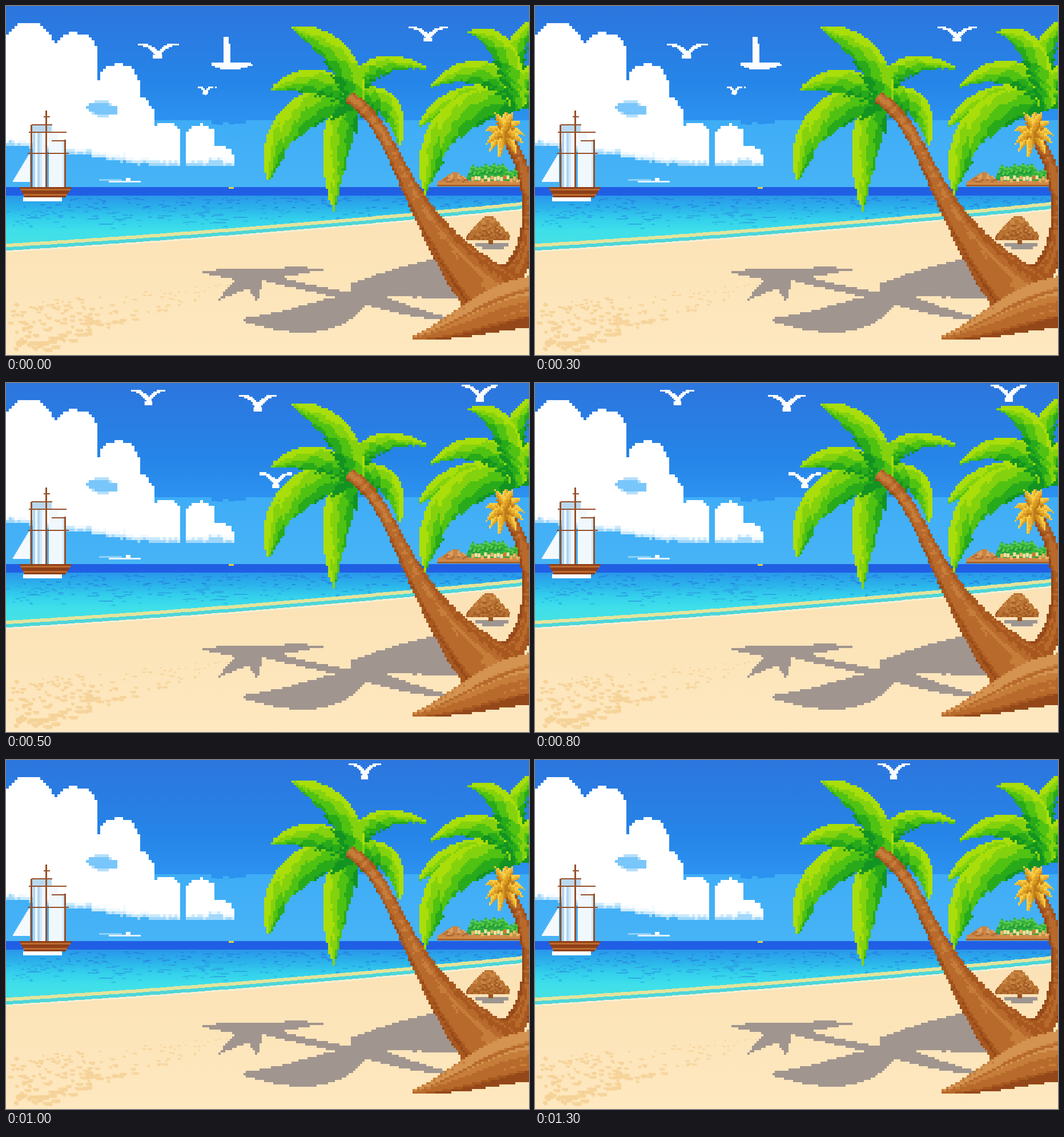
Write an HTML page with a canvas that moves like this. It is 916x611 px and loops after 1.5 s.

```html
<!DOCTYPE html>
<html lang="en">
<head>
<meta charset="utf-8">
<title>Pixel beach</title>
<style>
html, body { margin: 0; width: 100%; height: 100%; overflow: hidden; background: #fde5ba; }
canvas { position: absolute; left: 0; top: 0; }
.flock { visibility: hidden; animation: show 1500ms step-end infinite; }
.flock:nth-of-type(3) { animation-delay: -1000ms; }
.flock:nth-of-type(4) { animation-delay: -500ms; }
@keyframes show {
  0% { visibility: visible; }
  33.3333% { visibility: hidden; }
  100% { visibility: hidden; }
}
</style>
</head>
<body>
<canvas width="916" height="611"></canvas>
<canvas class="flock" width="916" height="611"></canvas>
<canvas class="flock" width="916" height="611"></canvas>
<canvas class="flock" width="916" height="611"></canvas>
<script>
const W = 916, H = 611;
const [scene, ...flocks] = [...document.querySelectorAll('canvas')].map(c => c.getContext('2d'));
let g = scene;

const hash = n => { const s = Math.sin(n * 127.1 + 11.7) * 43758.5453; return s - Math.floor(s); };
let seed = 7;
const rnd = () => hash(seed++);
const clamp = (v, lo, hi) => Math.max(lo, Math.min(hi, v));
const pick = (tones, v) => tones[clamp(Math.floor(v * tones.length), 0, tones.length - 1)];
const box = (color, x, y, w, h) => { g.fillStyle = color; g.fillRect(x, y, w, h); };
const times = (n, draw) => { for (let i = 0; i < n; i++) draw(i); };

function gradient(y0, y1, ...stops) {
  const gr = g.createLinearGradient(0, y0, 0, y1);
  stops.forEach((c, i) => gr.addColorStop(i / (stops.length - 1), c));
  return gr;
}

// Point on a Bezier curve of any order.
function at(pts, t) {
  while (pts.length > 1)
    pts = pts.slice(1).map(([x, y], i) => [pts[i][0] + (x - pts[i][0]) * t, pts[i][1] + (y - pts[i][1]) * t]);
  return pts[0];
}

// Thick pixel stroke: half(t) is the half width, paint(t, u) the colour at
// position t along the curve and u = -1..1 across it.
function limb(pts, half, paint, cell = 4) {
  const spine = [];
  times(61, i => {
    const t = i / 60, [x, y] = at(pts, t), [x0, y0] = at(pts, t - .01), [x1, y1] = at(pts, t + .01);
    const len = Math.hypot(x1 - x0, y1 - y0);
    spine.push({ t, x, y, w: half(t), dx: (x1 - x0) / len, dy: (y1 - y0) / len });
  });
  const pad = Math.max(...spine.map(p => p.w)) + 4;
  const lo = k => Math.floor((Math.min(...spine.map(p => p[k])) - pad) / cell) * cell;
  const hi = k => Math.max(...spine.map(p => p[k])) + pad;
  for (let y = lo('y'); y < hi('y'); y += cell)
    for (let x = lo('x'); x < hi('x'); x += cell) {
      let best = Infinity, p;
      for (const s of spine) {
        const d = Math.hypot(x + cell / 2 - s.x, y + cell / 2 - s.y);
        if (d < best) { best = d; p = s; }
      }
      const u = (p.dx * (y + cell / 2 - p.y) - p.dy * (x + cell / 2 - p.x)) / p.w;
      if (Math.abs(u) > 1 || best > p.w + 2) continue;
      const color = paint(p.t, u);
      if (color) box(color, x, y, cell, cell);
    }
}

const flat = color => () => color;

// Heap with a pointed top, wider towards its foot.
function mound(cx, top, w, h, tones) {
  for (let y = 0; y < h; y += 3) {
    const half = w / 2 * Math.min(1, .16 + (y / h) ** .85);
    for (let x = -half; x < half; x += 4)
      box(pick(tones, hash(Math.round(x / 4) + y * 7) * .6 + y / h * .4), Math.round(cx + x), top + y, 4, 3);
  }
}

function sky() {
  box(gradient(0, 200, '#2c76de', '#297de3', '#2685e8', '#2c92f0'), 0, 0, W, 200);
  box(gradient(200, 317, '#3fadf6', '#43b0f7', '#47b4f7'), 0, 200, W, 117);
  times(6, i => box('#2c92f0', 360 + i * 10, 199, 10, 2 + rnd() * 7));
}

function clouds() {
  const puffs = [[38, 72, 44], [118, 88, 42], [195, 136, 36], [222, 192, 35],
    [278, 230, 27], [338, 233, 27], [371, 270, 26]];
  const cell = 5;
  for (let x = 0; x < 398; x += cell) {
    const base = Math.min(275, 239 + x * .14) + 4 * hash(x);
    for (let y = 25; y < base; y += cell) {
      const under = puffs.filter(([cx, cy, r]) =>
        Math.abs(x - cx) < r && y > cy - Math.sqrt(r * r - (x - cx) ** 2) - 3 * hash(x + y));
      if (!under.length) continue;
      const core = under.some(([cx, cy, r]) => Math.hypot(x - cx + r * .25, (y - cy) * 1.2) < r * .48);
      const wisp = Math.sin(x * .13 + 2.2 * Math.sin(y * .028 + x * .01)) + .3 * Math.sin(y * .11);
      const depth = (base - y) / 12 - (core ? .5 : 0) - (wisp > .9 ? .35 : 0);
      box(pick(['#9fd8fb', '#cbe9fd', '#f0f9fe', '#ffffff'], depth), x, y, cell, cell);
    }
  }
  limb([[152, 178], [186, 182]], t => 15 * Math.sin(.6 + t * 2), (t, u) => Math.abs(u) > .75 ? '#b5dffb' : '#79c6fa', 5);
}

function sea() {
  box(gradient(332, 415, '#2a96ea', '#2bb2eb', '#34d0ec', '#3fe0ea', '#45e0e4'), 0, 332, W, 95);
  box('#205fe4', 0, 317, W, 15);
  times(330, () => {
    const x = rnd() * W, d = rnd() ** 1.5;
    box(pick(['#2589e2', '#2aa5e8', '#2bb9e6'], d), x, 335 + d * 55, 3 + rnd() * 7, 2);
  });
  times(22, () => box('#2ba8e2', rnd() * 400, 350 + rnd() * 32, 12 + rnd() * 14, 2));

  // distant boat and buoy
  box('#8dd0f8', 163, 303, 40, 3);
  box('#dff1fc', 180, 306, 56, 3);
  box('#ffffff', 210, 301, 8, 5);
  box('#e8d33c', 390, 317, 9, 3);
}

function beach() {
  const sand = gradient(360, 611, '#fbe2b6', '#fde5ba', '#fee8c0');
  for (let x = 0; x < W; x += 6) {
    const y = Math.round(430 - .06 * x - .000023 * x * x);
    box('#e2e49c', x, y - 14, 6, 6);
    box('#4ed6da', x, y - 8, 6, 6);
    box('#f8efd2', x, y - 2, 6, 3);
    box(sand, x, y + 1, 6, H - y);
  }
  times(330, () => {
    const x = rnd() * 390, d = rnd(), y = 520 - x * .09 + d * 95;
    if (d > 1.05 - x / 410) return;
    const s = .5 + (y - 485) / 100, w = (4 + rnd() * 8) * s;
    g.globalAlpha = .55 + .4 * (1 - x / 390);
    box('#f6d398', x, y, w, 3 * s);
    box('#f6d398', x + w * .25, y + 2 * s, w * .7, 2.4 * s);
  });
  g.globalAlpha = 1;
}

function ship() {
  const wood = '#96502a';
  times(16, i => box('#f4f9fd', 39 - i * 1.8, 260 + i * 3, 3 + i * 1.8, 3));
  box('#b9d9f0', 46, 208, 34, 13);
  times(14, i => {
    const gap = i === 6;
    if (!gap) box(pick(['#aed4f0', '#d3e8f7', '#f1f8fd'], hash(i + 3)), 47 + i * 4, 222 + (i > 10 ? 14 : 0), 4, i > 10 ? 82 : 96);
  });
  [[43, 208], [69, 183], [102, 234]].forEach(([x, top]) => box(wood, x, top, 3, 320 - top));
  [[45, 207, 36], [40, 220, 66], [38, 257, 72], [80, 235, 25], [66, 193, 11]]
    .forEach(([x, y, w]) => box(wood, x, y, w, 2));
  times(6, i => box(i % 3 === 1 ? '#bd6a30' : '#8f3f18', 24 + i * 1.6, 317 + i * 3, 91 - i * 3.6, 3));
  box('#ffffff', 30, 335, 68, 7);
}

function island() {
  times(12, i => mound(818 + i * 7.4, 274 + hash(i + 40) * 14, 22, 26, ['#5cc840', '#2fb03c', '#219a3c']));
  box('#d08a48', 756, 306, 160, 9);
  mound(785, 291, 52, 18, ['#dca060', '#c98446', '#b06a34']);
  times(18, i => box(pick(['#f0b060', '#d8742c', '#fbe0a0'], rnd()), 815 + i * 5.6, 296 + rnd() * 6, 5, 7));
  box('#a5602c', 755, 313, 161, 3);
}

function hut() {
  box('#9d9591', 822, 415, 58, 6);
  box('#9d9591', 834, 421, 38, 5);
  box('#9a5420', 845, 404, 8, 13);
  mound(844, 368, 76, 42, ['#c98744', '#b87232', '#a35c26']);
}

function shadows() {
  const gray = flat('#a1958f'), hub = [432, 474];
  [[345, 467], [376, 512], [440, 517], [555, 461]].forEach(([x, y], i) =>
    limb([hub, [(x + hub[0]) / 2, (y + hub[1]) / 2 - 4], [x, y]], t => (i % 3 ? 13 : 9) * (1 - t * t) + 1, gray));
  limb([[450, 474], [530, 495], [625, 512]], () => 6, gray);
  limb([[632, 508], [555, 560], [425, 550]], t => 5 + 21 * Math.sin(Math.PI * t ** .8), gray);
  limb([[618, 496], [690, 482], [800, 472]], t => 14 + 26 * t, gray);
  limb([[640, 512], [700, 535], [768, 547]], t => 13 - 9 * t, gray);
}

const leaf = ['#a9de0a', '#84d20d', '#50c212', '#28aa1a', '#129322'];
const gold = ['#f6cd48', '#eab030', '#d8981f', '#bd7a1c'];
const bark = ['#94481a', '#a8581f', '#b86a2c', '#c67d3a', '#d49350'];

// The outer side of a frond is light, the inner side and the base are dark.
function frond(base, ctrl, tip, half, tones = leaf, cell = 4) {
  const side = tip[0] < base[0] ? 1 : -1;
  const width = t => half * Math.sin(Math.PI * (.2 + .8 * t ** .95)) ** .7 + .5;
  limb([base, ctrl, tip], width, (t, u) => {
    const v = u * side, strand = hash(Math.floor(t * 22 + v * 3) + half);
    if (v < -.65 - .35 * strand) return null;
    return pick(tones, .42 * (1 - v) + .42 * (1 - t) - .18 + .22 * (strand - .5));
  }, cell);
}

// Bark grain runs along the limb, rings cross it near the top.
function trunk(pts, half, light = 0) {
  limb(pts, half, (t, u) => {
    const grain = hash(Math.floor(u * 5 + 20)) - .5, ring = hash(Math.floor(t * 50)) - .5;
    return pick(bark, .62 + light - .5 * (u - .1) ** 2 - .18 * u + .4 * grain * t + .25 * ring * (1 - t));
  });
}

function rightPalm() {
  const crown = [893, 164];
  frond(crown, [905, 118], [940, 112], 24);
  frond(crown, [785, 143], [723, 211], 22);
  frond(crown, [745, 178], [734, 328], 34);
  frond(crown, [835, 82], [743, 142], 23);
  frond(crown, [882, 60], [925, 28], 20);
  frond(crown, [878, 48], [812, 46], 23);
  trunk([[888, 248], [930, 320], [925, 440], [876, 478]], t => 11 + 14 * t ** 3, -.12);
}

function goldPalm() {
  times(11, i => {
    const a = i * 2.4, x = 873 + 34 * Math.cos(a), y = 226 + 42 * Math.sin(a);
    frond([873, 222], [(873 + x) / 2, (222 + y) / 2 - 8], [x, y], 7, gold, 3);
  });
}

function leftPalm() {
  const crown = [610, 164];
  frond(crown, [685, 148], [689, 246], 22);
  frond(crown, [575, 215], [574, 356], 29);
  frond(crown, [478, 172], [459, 306], 33);
  frond(crown, [535, 112], [464, 147], 23);
  frond(crown, [630, 80], [738, 109], 19);
  frond(crown, [592, 66], [498, 37], 26);
  trunk([[610, 166], [690, 225], [690, 360], [850, 505]], t => 11 + 45 * t ** 4);
}

function roots() {
  limb([[716, 581], [800, 562], [850, 525], [935, 515]], t => 4 + 40 * Math.sin(t * Math.PI / 2), (t, u) => {
    const grain = hash(Math.floor((u + 1) * 6 + t * 1.5) + 5) - .5;
    return pick(bark, .5 - .4 * u + .5 * grain);
  });
}

[sky, clouds, sea, island, beach, ship, hut, shadows, rightPalm, goldPalm, leftPalm, roots].forEach(draw => draw());

const white = flat('#fbfcfe');

// Two bent wings meeting above a small body.
function gull(x, y, w, h) {
  const cx = x + w / 2, thick = h / 11;
  [-1, 1].forEach(s => limb([[cx + s * (w / 2 - 2), y + 3], [cx + s * w * .22, y + h * .12], [cx, y + h * .72]],
    t => thick * (.8 + .7 * t), white, 3));
  box('#fbfcfe', cx - w * .13, y + h * .76, w * .24, h * .24);
}

g = flocks[0];
gull(232, 64, 68, 28);
gull(331, 138, 36, 17);
gull(708, 35, 63, 27);
limb([[386, 60], [387, 100]], t => 5 + 2 * t, white, 3);
limb([[364, 103], [390, 106], [426, 103]], t => 3 + 4 * Math.sin(Math.PI * t), white, 3);

g = flocks[1];
gull(222, 10, 56, 29);
gull(411, 19, 61, 31);
gull(447, 156, 52, 28);
gull(801, 2, 59, 31);

g = flocks[2];
gull(603, 4, 51, 30);
</script>
</body>
</html>
```
